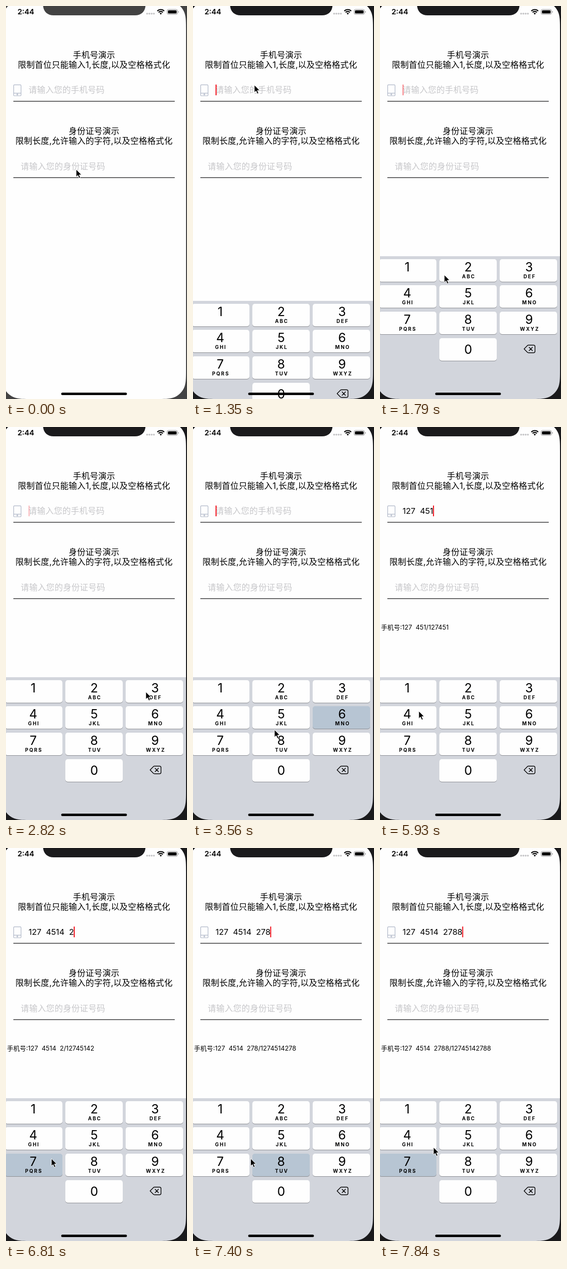
Write an HTML page that moves like this. It is 369x801 px and loops after 7990 ms.

```html
<!DOCTYPE html>
<html lang="zh-CN">
<head>
<meta charset="utf-8">
<title>输入演示</title>
<style>
html, body { margin: 0; width: 100%; height: 100%; overflow: hidden; background: #fefefe; }
svg { display: block; }
text { font: 17px Inter, "Noto Sans CJK SC", "Noto Sans CJK", sans-serif; white-space: pre; }
.mid { text-anchor: middle; }
.zh { letter-spacing: .23px; }
.hint { fill: #c7c7ca; }
.clock { font-size: 15px; font-weight: 600; }
.log { font-size: 13px; }
.num { font-size: 16.5px; }
.digit { font-size: 25.5px; }
.letters { font-size: 10px; font-weight: 700; letter-spacing: 2px; }
</style>
</head>
<body>
<svg width="369" height="801" viewBox="0 0 369 801">
  <defs>
    <path id="corner" d="M-1-1V61.1H0C0 43.5 0 34.7 3 25.3C6.8 14.9 14.9 6.8 25.3 3C34.7 0 43.5 0 61.1 0V-1z"/>
  </defs>
  <rect width="369" height="801" fill="#fefefe"/>

  <g class="mid zh">
    <text x="179.5" y="105.5">手机号演示</text>
    <text x="179.5" y="125.5">限制首位只能输入1,长度,以及空格格式化</text>
    <text x="179.5" y="261">身份证号演示</text>
    <text x="179.5" y="281">限制长度,允许输入的字符,以及空格格式化</text>
  </g>
  <path d="M15 194.2H344M15 349.7H344" stroke="#38383a" stroke-width="1.4"/>
  <g fill="none" stroke="#adb5c6" stroke-width="1.2">
    <rect x="15.6" y="160.6" width="15" height="22.4" rx="1.6"/>
    <path d="M15.6 177.6H30.6"/>
    <circle cx="23.1" cy="180.3" r="1.2"/>
  </g>
  <text id="hint" class="hint zh" x="46" y="177">请输入您的手机号码</text>
  <text class="hint zh" x="30" y="332.5">请输入您的身份证号码</text>
  <text id="num" class="num" x="46" y="177"></text>
  <rect id="caret" x="46" y="160" width="2" height="22" rx=".6" fill="#f00b16"/>
  <text id="log" class="log" x="2" y="412.5"></text>

  <g id="pad">
    <rect y="510" width="367" height="291" fill="#d2d5dc"/>
    <g id="keys"></g>
    <path d="M293.8 699L300.4 692.2Q301.3 691.3 302.6 691.3H313Q316 691.3 316 694.3V703.7Q316 706.7 313 706.7H302.6Q301.3 706.7 300.4 705.8zM304 695.6L310.8 702.4M310.8 695.6L304 702.4"
      fill="none" stroke="#000" stroke-width="1.4" stroke-linejoin="round" stroke-linecap="round"/>
  </g>

  <g id="bezel">
    <use href="#corner" transform="translate(-8 -11)"/>
    <use href="#corner" transform="translate(367 -11) scale(-1 1)"/>
    <use href="#corner" transform="translate(-8 801) scale(1 -1)"/>
    <use href="#corner" transform="translate(367 801) scale(-1 -1)"/>
    <rect x="367" width="2" height="801"/>
    <path d="M75.5 -2C76 11 84 19 97 19H263C276 19 284 11 284.5 -2z"/>
  </g>
  <rect x="112.5" y="788" width="134" height="5" rx="2.5"/>

  <text class="clock mid" x="40.5" y="17">2:44</text>
  <g fill="#c6c6c8">
    <circle cx="287.7" cy="15.6" r="1.9"/><circle cx="292.3" cy="15.6" r="1.9"/>
    <circle cx="296.9" cy="15.6" r="1.9"/><circle cx="301.5" cy="15.6" r="1.9"/>
  </g>
  <g fill="none" stroke="#000" stroke-width="2.1">
    <path d="M308.5 10.2A9.7 9.7 0 0 1 322.5 10.2M311.1 13A6.1 6.1 0 0 1 319.9 13"/>
    <path d="M315.5 17.6L313.2 15.2A3.2 3.2 0 0 1 317.8 15.2z" fill="#000" stroke="none"/>
  </g>
  <rect x="328.5" y="7" width="21" height="10" rx="2.8" fill="none" stroke="#8d8d8f"/>
  <rect x="330.2" y="8.7" width="17.6" height="6.6" rx="1.5"/>
  <path d="M351 10.3Q352.4 10.8 352.4 12T351 13.7z" fill="#8d8d8f"/>

  <path id="mouse" d="M0 0V15.4L3.5 12.1L6.1 18L8.7 16.8L6.2 11.1H11z" stroke="#fff" stroke-width="1" stroke-linejoin="round"/>
</svg>
<script>
const LOOP = 7990, TICK = 147.5, START = 1350;
const $ = id => document.getElementById(id);
const clamp = (v, lo, hi) => Math.min(hi, Math.max(lo, v));

// Key taps as [tick, key]; tick 0 is at START.
const TAPS = [
  [5, 2], [9, 3], [15, 6], [17, 1], [20, 2], [24, 7], [26, 4], [28, 5],
  [30, 1], [32, 4], [34, 2], [37, 7], [40, 8], [41, 8], [44, 7]
];

const LETTERS = ['', '', 'ABC', 'DEF', 'GHI', 'JKL', 'MNO', 'PQRS', 'TUV', 'WXYZ'];
const colOf = n => n ? (n - 1) % 3 : 1;
const topOf = n => 516 + Math.floor(53.8 * (n ? Math.floor((n - 1) / 3) : 3));

function keyMarkup(n) {
  const col = colOf(n), x = -2 + col * 123, y = topOf(n), mid = 55.5 + col * 124.2;
  return `<rect x="${x}" y="${y + 1}" width="117" height="46" rx="5" fill="#8b8d92"/>
    <rect id="key${n}" x="${x}" y="${y}" width="117" height="46" rx="5"/>
    <text class="digit mid" x="${mid}" y="${y + (n ? 25.3 : 32)}">${n}</text>
    <text class="letters mid" x="${mid + 1.3}" y="${y + 39.3}">${LETTERS[n]}</text>`;
}
$('keys').innerHTML = LETTERS.map((_, n) => keyMarkup(n)).join('');

// The pointer reaches a key one tick before its tap, with a few free points besides.
const spot = n => [[79, 131, 285][colOf(n)], topOf(n) + 10];
const PATH = [
  [-6, 143, 333], [-2, 123, 147], [-1, 125, 161], [0, 125, 161],
  [3, 131, 548], [15, 166, 617], [44, 109, 610],
  ...TAPS.map(([k, n]) => [k - 1, ...spot(n)])
].sort((a, b) => a[0] - b[0]);

function mouseAt(k) {
  const i = Math.max(1, PATH.findIndex(p => p[0] >= k));
  const a = PATH[i - 1], b = PATH[i];
  const f = (k - a[0]) / (b[0] - a[0]), ease = f * f * (3 - 2 * f);
  return [1, 2].map(j => a[j] + (b[j] - a[j]) * ease);
}

// The number must begin with 1 and has 11 digits; other taps are ignored.
function entry(k) {
  let raw = '', last = -.7;
  for (const [at, n] of TAPS) {
    if (at >= k || raw.length === 11 || (!raw && n !== 1)) continue;
    raw += n;
    last = at + 1;
  }
  return { raw, last };
}

function blink(ms) {
  const p = ms % 1000;
  return p < 850 ? clamp((620 - p) / 140, 0, 1) : (p - 850) / 150;
}

function tickAt(t) {
  if (t < 1050) return clamp(Math.floor(t / 150) - 7, -6, -2);
  return Math.max(-1, Math.floor((t - START + 10) / TICK));
}

function show(k) {
  const { raw, last } = entry(k);
  const spaced = [raw.slice(0, 3), raw.slice(3, 7), raw.slice(7)].filter(Boolean).join('  ');

  $('hint').style.display = raw ? 'none' : '';
  $('num').textContent = spaced;
  $('log').textContent = raw && `手机号:${spaced}/${raw}`;
  $('caret').setAttribute('x', 46 + (raw ? $('num').getComputedTextLength() - .5 : 0));
  $('caret').setAttribute('opacity', k < 0 ? 0 : blink((k - last) * TICK));

  $('pad').setAttribute('transform', `translate(0 ${Math.round(91 * .1 ** k)})`);
  for (let n = 0; n < 10; n++) {
    const lit = TAPS.some(([at, key]) => at === k && key === n);
    $('key' + n).setAttribute('fill', lit ? '#b7c5d3' : '#fefefe');
  }
  $('bezel').setAttribute('fill', k < -1 ? '#434343' : '#1a1a1c');
  $('mouse').setAttribute('transform', `translate(${mouseAt(k)})`);
}

const begin = performance.now();
let shown;
function frame() {
  const k = tickAt((performance.now() - begin) % LOOP);
  if (k !== shown) show(shown = k);
  requestAnimationFrame(frame);
}
frame();
</script>
</body>
</html>
```
